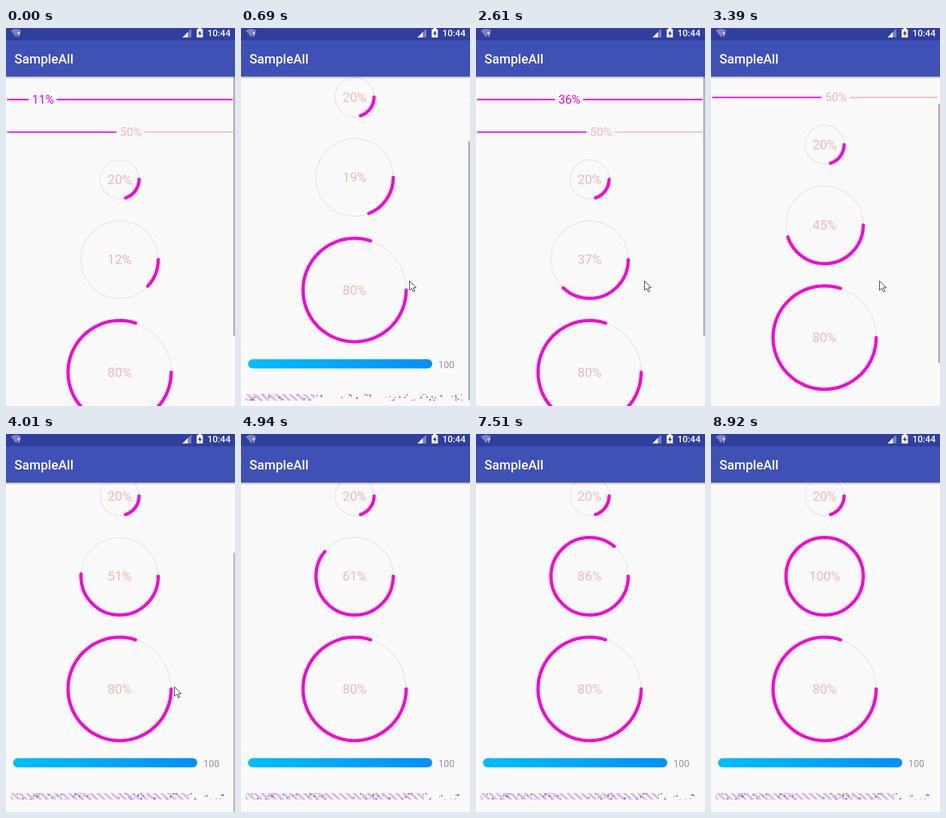
Animation, 388 px wide and 639 px high, one loop 9860 ms. Source, as an HTML page:

```html
<!DOCTYPE html>
<html lang="en">
<head>
<meta charset="utf-8">
<title>SampleAll</title>
<style>
  html, body { margin: 0; width: 100%; height: 100%; overflow: hidden; background: #fafafa; }
  svg { display: block; width: 100vw; height: 100vh; }
  text { font-family: Roboto, sans-serif; }
  .mid { text-anchor: middle; }
</style>
</head>
<body>
<svg id="stage" viewBox="0 0 388 639">
  <defs>
    <linearGradient id="blue">
      <stop offset="0" stop-color="#00bffb"/>
      <stop offset="1" stop-color="#008ffb"/>
    </linearGradient>
    <linearGradient id="shade" x2="0" y2="1">
      <stop offset="0" stop-color="#000" stop-opacity=".3"/>
      <stop offset="1" stop-color="#000" stop-opacity="0"/>
    </linearGradient>
    <pattern id="hatch" width="12" height="11" patternUnits="userSpaceOnUse" x="8" y="758">
      <path d="M-12 0h6l12 11h-6zM0 0h6l12 11h-6z" fill="#d6bfe6"/>
    </pattern>
    <clipPath id="view"><rect y="82" width="388" height="557"/></clipPath>
    <clipPath id="strip"><rect x="8" y="758" width="370" height="11"/></clipPath>
  </defs>
  <rect width="388" height="639" fill="#fafafa"/>
  <g clip-path="url(#view)">
    <g id="page">
      <g id="lines"></g>
      <g id="rings"></g>
      <rect x="12" y="699" width="312" height="15.5" rx="7.75" fill="url(#blue)"/>
      <text x="334.5" y="714.3" font-size="16" fill="#929097">100</text>
      <g clip-path="url(#strip)">
        <rect id="hatched" x="8" y="758" height="11" fill="url(#hatch)"/>
        <g id="dots" fill="#aa62cc"></g>
      </g>
    </g>
    <rect id="thumb" x="385" width="3" height="438.2" fill="#b0b0b0"/>
  </g>
  <rect y="82" width="388" height="4" fill="url(#shade)"/>
  <rect width="388" height="82" fill="#3f51b5"/>
  <rect width="388" height="21" fill="#303f9f"/>
  <text x="14.3" y="60" font-size="22" font-weight="500" fill="#fff">SampleAll</text>
  <g fill="#fff">
    <path d="M8 4.5Q17 -2 26 4.5L17 15.5Z" opacity=".35"/>
    <text x="19" y="15" font-size="11" font-weight="700">?</text>
    <path d="M314 1V16H299Z" opacity=".35"/>
    <path d="M308 7V16H299Z"/>
    <path d="M326 0h5v2h2.5v14h-10.500v-14h3z"/>
    <path d="M329.200 4l-4 6h2.600v4l4-6h-2.600z" fill="#303f9f"/>
    <text x="380.500" y="14" font-size="15.500" font-weight="500" text-anchor="end">10:44</text>
  </g>
  <path id="cursor" d="M285.500 427.500v16l3.700-3.500 2.800 6 2.600-1.200-2.800-5.800h5.200z"
        fill="#fff" stroke="#222" stroke-width="1"/>
</svg>
<script>
const LOOP = 9860, MAX_SCROLL = 151;
const HOT = '#fa00d2', PALE = '#f9b6b6';
const $ = id => document.getElementById(id);

function add(parent, tag, attrs) {
  const node = document.createElementNS('http://www.w3.org/2000/svg', tag);
  set(node, attrs);
  return parent.appendChild(node);
}
function set(node, attrs) {
  for (const key in attrs) node.setAttribute(key, attrs[key]);
}
const clamp = (v, lo = 0, hi = 1) => Math.min(hi, Math.max(lo, v));
const ramp = (t, from, to) => clamp((t - from) / (to - from));
const easeOut = u => 1 - (1 - u) ** 2;

// Bursts of counter ticks: first tick, last tick, number of ticks.
const BURSTS = [
  [70, 690, 7], [800, 1840, 10], [1990, 1990, 1], [2070, 2290, 4],
  [2440, 2900, 7], [3070, 3220, 3], [3390, 3610, 4], [3780, 3850, 2],
  [4010, 4090, 2], [4230, 4550, 5], [4710, 4940, 4], [5110, 5250, 3],
  [5410, 5560, 3], [5720, 5940, 4], [6110, 6250, 3], [6410, 6630, 4],
  [6800, 6950, 3], [7120, 7350, 4], [7510, 7660, 3], [7840, 7980, 3],
  [8150, 8370, 4], [8530, 8680, 3], [8850, 8920, 2]
];
const ticks = BURSTS.flatMap(([from, to, n]) =>
  Array.from({ length: n }, (_, i) => from + (to - from) * i / Math.max(1, n - 1)));
const countAt = t => 12 + ticks.filter(tick => tick <= t + 0.5).length;

function lineBar(y, restColor, textColor, weight) {
  const line = stroke => add($('lines'), 'line', { y1: y, y2: y, stroke, 'stroke-width': weight });
  const done = line(HOT), rest = line(restColor);
  const label = add($('lines'), 'text', { y: y + 6.7, 'font-size': 20, fill: textColor });
  return value => {
    const x = 2 + 3.82 * value;
    const width = 14.7 + 11.23 * String(value).length;
    set(done, { x1: 2, x2: x - 5.5 });
    set(rest, { x1: x + width + 4.8, x2: 384 });
    set(label, { x: x + 0.3 });
    label.textContent = value + '%';
  };
}

function ring(cy, r) {
  const base = { cx: 192.5, cy, r, fill: 'none' };
  add($('rings'), 'circle', { ...base, stroke: '#ececec', 'stroke-width': 2.2 });
  const arc = add($('rings'), 'circle', {
    ...base, stroke: HOT, 'stroke-width': 5.5, 'stroke-linecap': 'round', pathLength: 100
  });
  const label = add($('rings'), 'text', {
    x: 192.5, y: cy + 7.7, 'font-size': 22, fill: PALE, class: 'mid'
  });
  return value => {
    set(arc, { 'stroke-dasharray': value + ' 200' });
    label.textContent = value + '%';
  };
}

const topBar = lineBar(121, HOT, '#ee08cb', 2.5);
lineBar(176, PALE, PALE, 2.2)(50);
ring(255.8, 33)(20);
const midRing = ring(391.6, 65.5);
ring(582, 87.4)(80);

let seed = 7;
const random = () => (seed = seed * 16807 % 2147483647) / 2147483647;
const dots = Array.from({ length: 64 }, () => ({
  x: random() * 370, y: random() * 11, speed: 20 + random() * 60,
  node: add($('dots'), 'circle', { r: 0.6 + random() * 1.2 })
}));

function scrollAt(t) {
  const down = easeOut(ramp(t, 490, 770));
  const up = easeOut(ramp(t, 2010, 2290));
  const again = easeOut(ramp(t, 3330, 3610));
  return MAX_SCROLL * (down - up + again);
}

function thumbAlpha(t) {
  if (t < 2010) return 1 - ramp(t, 1250, 1600);
  if (t < 3330) return 1 - ramp(t, 2640, 2900);
  return 1 - ramp(t, 3920, 4400);
}

function draw(t) {
  const count = countAt(t), scroll = scrollAt(t);
  topBar(count - 1);
  midRing(count);
  set($('page'), { transform: `translate(0 ${-scroll})` });
  set($('thumb'), { y: 82 + scroll * 557 / 708, opacity: thumbAlpha(t) });
  set($('hatched'), { width: clamp(117 + (t - 690) * 0.1026, 0, 302) });
  const drift = Math.min(t, 3610) / 1000;
  for (const d of dots) {
    set(d.node, { cx: 8 + (d.x + d.speed * drift) % 370, cy: 758 + d.y });
  }
  set($('cursor'), { visibility: t >= 300 && t < 4390 ? 'visible' : 'hidden' });
}

const start = performance.now();
function frame() {
  draw((performance.now() - start) % LOOP);
  requestAnimationFrame(frame);
}
frame();
</script>
</body>
</html>
```
